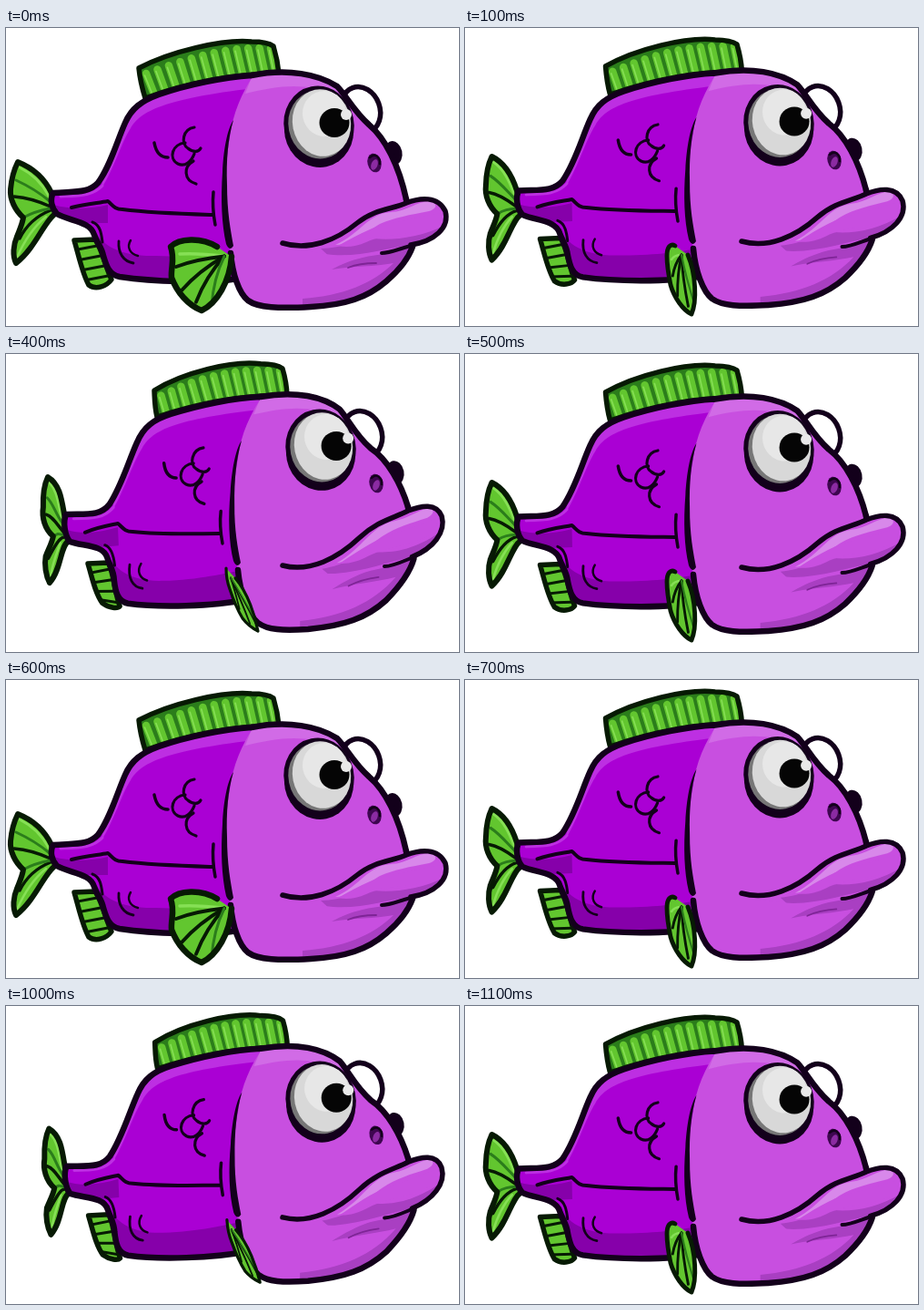
An HTML page with a canvas that plays this animation: 498 px wide and 327 px high, repeating every 1.2 s.

```html
<!DOCTYPE html>
<html lang="en">
<head>
<meta charset="utf-8">
<title>Swimming fish</title>
<style>
  html, body { margin: 0; width: 100%; height: 100%; overflow: hidden; background: #fff; }
  canvas { display: block; }
</style>
</head>
<body>
<canvas id="stage" width="498" height="327"></canvas>
<script>
const ctx = document.getElementById('stage').getContext('2d');
const STEP = 100;

// How far the fish has turned at each step of the loop.
const TURN = [0, 0.5, 1, 1.08, 1, 0.5, 0, 0.5, 0.94, 1.07, 1.04, 0.5];

const INK = '#13001b', BODY = '#aa00d4', BODY_LIGHT = '#bd2fe2', BODY_DARK = '#8600aa';
const HEAD = '#c84fe0', HEAD_LIGHT = '#d888ea', HEAD_DARK = '#a93fc2';
const GREEN = '#62c62f', GREEN_LIGHT = '#86e055', GREEN_DARK = '#2b7d1b', GREEN_INK = '#071a04';

// Anchors x, y, dx, dy: where each spot moves on a full turn.
const ANCHORS = [
  [13, 145, 33, -12], [3, 178, 36, -9], [10, 258, 37, -7], [18, 208, 33, -8],
  [51, 182, 14, -5], [54, 204, 14, 2], [97, 286, 15, -9], [76, 233, 15, -3],
  [118, 272, 9, 1], [180, 278, 6, 1], [118, 150, 12, -6], [148, 82, 13, -8],
  [143, 42, 17, -4], [200, 62, 12, -6], [298, 15, 10, -4], [190, 140, 9, -6],
  [115, 195, 11, -4], [228, 205, 8, -8], [245, 105, 9, -6], [244, 240, 8, -10],
  [266, 300, 11, -4], [335, 305, -3, -4], [400, 288, -1, -6], [345, 105, 2, -3],
  [303, 236, 0, -4], [405, 147, 2, -6], [440, 190, 2, -20], [485, 208, -4, -23],
  [413, 245, 3, -14], [395, 90, 2, -2]
];

let turn = 0;

function warp(x, y) {
  let sx = 0, sy = 0, sum = 0;
  for (const [ax, ay, dx, dy] of ANCHORS) {
    const w = 1 / ((x - ax) ** 2 + (y - ay) ** 2 + 25) ** 1.5;
    sx += dx * w;
    sy += dy * w;
    sum += w;
  }
  return [x + turn * sx / sum, y + turn * sy / sum];
}

function shape(d) {
  return new Path2D(d.replace(/(-?[\d.]+) (-?[\d.]+)/g, (m, x, y) => warp(+x, +y).join(' ')));
}

function fill(path, color) {
  ctx.fillStyle = color;
  ctx.fill(typeof path === 'string' ? shape(path) : path);
}

function line(path, width, color = INK) {
  ctx.strokeStyle = color;
  ctx.lineWidth = width;
  ctx.stroke(typeof path === 'string' ? shape(path) : path);
}

function inside(path, draw) {
  ctx.save();
  ctx.clip(path);
  draw();
  ctx.restore();
}

function oval(x, y, rx, ry, tilt, color, width) {
  const [cx, cy] = warp(x, y);
  ctx.beginPath();
  ctx.ellipse(cx, cy, rx, ry, tilt, 0, Math.PI * 2);
  ctx.fillStyle = color;
  ctx.fill();
  if (width) {
    ctx.strokeStyle = INK;
    ctx.lineWidth = width;
    ctx.stroke();
  }
}

const mix = (a, b, t) => a + (b - a) * t;

function dorsalFin() {
  const edge = shape('M146 44 C180 26 238 12 270 15 C282 15 290 17 294 20 C297 30 299 40 300 50 C250 50 200 60 153 77 C149 64 147 54 146 44 Z');
  fill(edge, GREEN_DARK);
  inside(edge, () => {
    for (let i = 0; i < 12; i++) {
      const t = i / 11;
      const x = mix(154, 291, t), y = 46 - 28 * Math.sin(t * 1.75);
      const bx = mix(163, 296, t), by = 73 - 27 * Math.sin(t * 1.5);
      const ray = `M${x} ${y + 4} L${bx} ${by}`;
      line(ray, 8.5, GREEN);
      line(`M${x - 1.5} ${y + 6} L${bx - 2} ${by}`, 1.6, GREEN_LIGHT);
    }
  });
  line(edge, 5.5, GREEN_INK);
}

function tail() {
  const edge = shape('M13 147 C28 153 42 164 50 181 L54 204 C42 212 32 242 11 258 C7 250 8 238 12 229 C15 221 18 215 19 208 C10 200 4 188 5 177 C6 165 9 155 13 147 Z');
  fill(edge, GREEN);
  inside(edge, () => {
    line('M15 153 C29 160 40 171 47 184', 3, GREEN_LIGHT);
    line('M12 252 C19 236 28 220 44 207', 2.5, GREEN_LIGHT);
    line('M11 167 C24 173 36 180 48 190', 3, GREEN_DARK);
    line('M9 185 C22 186 36 190 49 196', 3.5, GREEN_INK);
    line('M15 231 C22 217 34 206 49 200', 3.5, GREEN_INK);
    line('M19 208 C28 203 38 200 49 198', 3, GREEN_DARK);
  });
  line(edge, 6, GREEN_INK);
}

function bellyFin() {
  const edge = shape('M75 233 C80 250 84 270 91 282 C99 288 111 283 116 276 C109 262 107 246 98 232 Z');
  fill(edge, GREEN);
  inside(edge, () => {
    for (let i = 0; i < 4; i++) {
      const y = 244 + i * 11;
      line(`M${74 + i * 4} ${y} L${100 + i * 4} ${y - 5}`, 3, GREEN_INK);
    }
  });
  line(edge, 5.5, GREEN_INK);
}

function body() {
  const edge = shape('M52 181 C74 179 90 182 101 170 C115 151 122 124 131 104 C138 88 149 80 168 73 C200 62 240 54 270 52 L320 60 L310 290 L255 275 C220 281 160 278 125 273 C113 271 110 260 107 250 C105 240 100 236 97 227 C93 212 70 212 56 204 C50 198 48 188 52 181 Z');
  fill(edge, BODY);
  inside(edge, () => {
    fill('M105 176 C119 154 127 125 137 110 C148 91 174 78 272 66 L276 48 L150 65 L110 130 Z', BODY_LIGHT);
    fill('M52 194 C70 199 92 199 112 194 L112 214 L55 214 Z', BODY_DARK);
    fill('M96 218 C104 241 130 251 165 250 C205 252 232 250 256 246 L258 290 L110 290 Z', BODY_DARK);
    line('M60 185 C82 184 96 184 106 173', 3, BODY_LIGHT);
  });
  line(edge, 6.5);

  line('M72 197 C88 193 102 192 112 190 C117 194 119 199 128 199 C160 203 195 204 227 205', 4);
  line('M228 180 C227 190 227 200 230 216', 3.5);
  line('M95 213 C104 216 105 227 106 235', 3);

  line('M163 126 C165 137 170 142 178 142', 3.5);
  line('M207 109 C194 111 192 127 200 132 C206 137 212 136 214 132', 3.2);
  line('M197 126 C183 127 178 143 189 149 C197 153 204 146 207 138', 3.2);
  line('M206 146 C195 152 195 167 209 171', 3.2);
  line('M124 234 C123 247 129 256 140 258', 2.8);
  line('M137 233 C132 241 137 248 145 250', 2.5);
}

function head() {
  oval(390, 90, 21, 26, -0.35, '#fff', 5.5);
  oval(426, 137, 9.5, 13, -0.2, INK);

  const front = 'C310 44 344 51 364 64 C374 74 382 91 399 106 C417 121 432 151 440 188 ';
  const chin = 'L447 240 C442 254 432 266 418 278 C397 296 373 304 335 306 C300 308 277 307 266 299 C256 291 249 270 247 247 ';
  const edge = shape('M272 52 ' + front + chin + 'C240 210 239 160 246 120 C249 94 260 70 272 52 Z');
  fill(edge, HEAD);
  inside(edge, () => {
    fill('M272 49 C310 44 344 51 368 68 L362 74 C330 59 300 63 263 72 Z', '#d16be6');
    fill('M450 237 C430 249 410 247 392 252 C379 255 367 260 358 265 C382 261 405 262 426 258 C404 280 370 294 326 297 L326 310 L420 300 L460 250 Z', HEAD_DARK);
  });
  line('M270 52 ' + front, 6.5);
  line('M440 188 ' + chin, 6.5);
  fill('M250 101 C244 121 242 145 243 172 C243 202 247 222 250 239 C247 244 244 242 242 237 C237 215 236 188 238 158 C239 135 243 111 250 101 Z', INK);
}

function mouth() {
  const edge = shape('M304 237 C333 245 363 233 386 214 C406 198 425 199 440 192 C455 186 475 184 483 201 C488 219 471 234 445 238 C420 241 392 251 360 249 C340 247 320 243 304 237 Z');
  fill(edge, HEAD);
  inside(edge, () => {
    fill('M362 238 C391 225 398 203 424 202 C441 201 452 190 466 190 C474 192 475 198 465 201 C444 205 427 208 411 215 C397 223 385 238 362 238 Z', HEAD_LIGHT);
    fill('M346 242 C371 242 391 230 404 231 C425 233 454 231 486 215 L470 242 L360 255 Z', HEAD_DARK);
    fill('M365 239 C390 225 407 216 427 213 C443 211 460 205 477 203 L478 217 C451 228 417 225 396 235 C385 240 374 241 365 239 Z', HEAD);
  });
  line('M304 236 C333 245 363 233 386 214 C406 198 425 199 440 192 C455 186 475 184 483 201 C488 219 471 234 445 238', 5.5);
  line('M413 247 C423 247 435 241 449 238', 4);
  line('M376 263 C386 259 396 258 407 258', 1.8, '#7e2496');
}

function face() {
  oval(344, 112, 38, 41, -0.2, INK);
  oval(344, 106, 36, 40, -0.2, '#777', 5);
  oval(347, 104, 32, 37, -0.2, '#d8d8d8');
  oval(350, 94, 24, 25, -0.2, '#e7e7e7');
  oval(361, 104, 16.5, 16, 0, '#050505');
  oval(374, 95, 6, 6, 0, '#e9e9e9');
  oval(405, 148, 7.5, 10.5, -0.25, '#3e0650');
  oval(405, 150, 3.5, 6, 0.35, '#8b2ba2');
  line('M400 142 C406 136 412 143 411 149', 2.5);
}

// Side fin: spread, edge-on and folded poses share one outline layout.
const FIN = [
  [232, 240, 214, 229, 190, 231, 181, 240, 186, 254, 181, 262, 182, 274, 188, 290, 200, 304, 215, 310, 232, 302, 246, 278, 248, 251],
  [231, 239, 226, 236, 222, 240, 222, 250, 222, 260, 224, 272, 226, 282, 230, 296, 240, 310, 249, 314, 255, 300, 254, 270, 245, 249],
  [242, 235, 242, 241, 243, 250, 246, 258, 250, 270, 254, 280, 260, 290, 266, 298, 271, 301, 277, 304, 274, 288, 266, 262, 252, 246]
];

function sideFin() {
  const k = turn < 0.5 ? 0 : 1;
  const t = turn * 2 - k;
  const p = FIN[k].map((v, i) => mix(v, FIN[k + 1][i], t));
  const edge = new Path2D(`M${p[0]} ${p[1]} C${p.slice(2, 8)} C${p.slice(8, 14)} C${p.slice(14, 20)} C${p.slice(20)}`);
  const rootX = mix(p[0], p[24], 0.5), rootY = mix(p[1], p[25], 0.5);
  const thin = Math.max(0.45, 1 - turn * 0.55);
  fill(edge, GREEN);
  inside(edge, () => {
    const ray = (x, y, width, color) => {
      const path = new Path2D();
      path.moveTo(rootX, rootY + 5);
      path.quadraticCurveTo(mix(rootX, x, 0.5) - 5 * (1 - turn), mix(rootY, y, 0.5), x, y);
      line(path, width, color);
    };
    ray(p[8] + 5, p[9] - 6, 3.5 * thin, GREEN_LIGHT);
    ray(p[10] + 6 * thin, p[11], 4 * thin, GREEN_INK);
    ray(p[14] + 5 * thin, p[15] - 2, 4 * thin, GREEN_INK);
    ray(mix(p[16], p[18], 0.6), mix(p[17], p[19], 0.6) - 7, 4 * thin, GREEN_INK);
    ray(mix(p[18], p[20], 0.65), mix(p[19], p[21], 0.65), 3 * thin, GREEN_DARK);
  });
  line(edge, 6 * thin + 0.5, GREEN_INK);
}

function draw() {
  ctx.fillStyle = '#fff';
  ctx.fillRect(0, 0, 498, 327);
  ctx.lineCap = ctx.lineJoin = 'round';
  tail();
  bellyFin();
  dorsalFin();
  body();
  head();
  mouth();
  face();
  sideFin();
}

const start = performance.now();
let shown = -1;

function tick() {
  const step = Math.floor((performance.now() - start) / STEP) % TURN.length;
  if (step !== shown) {
    shown = step;
    turn = TURN[step];
    draw();
  }
  requestAnimationFrame(tick);
}
tick();
</script>
</body>
</html>
```
